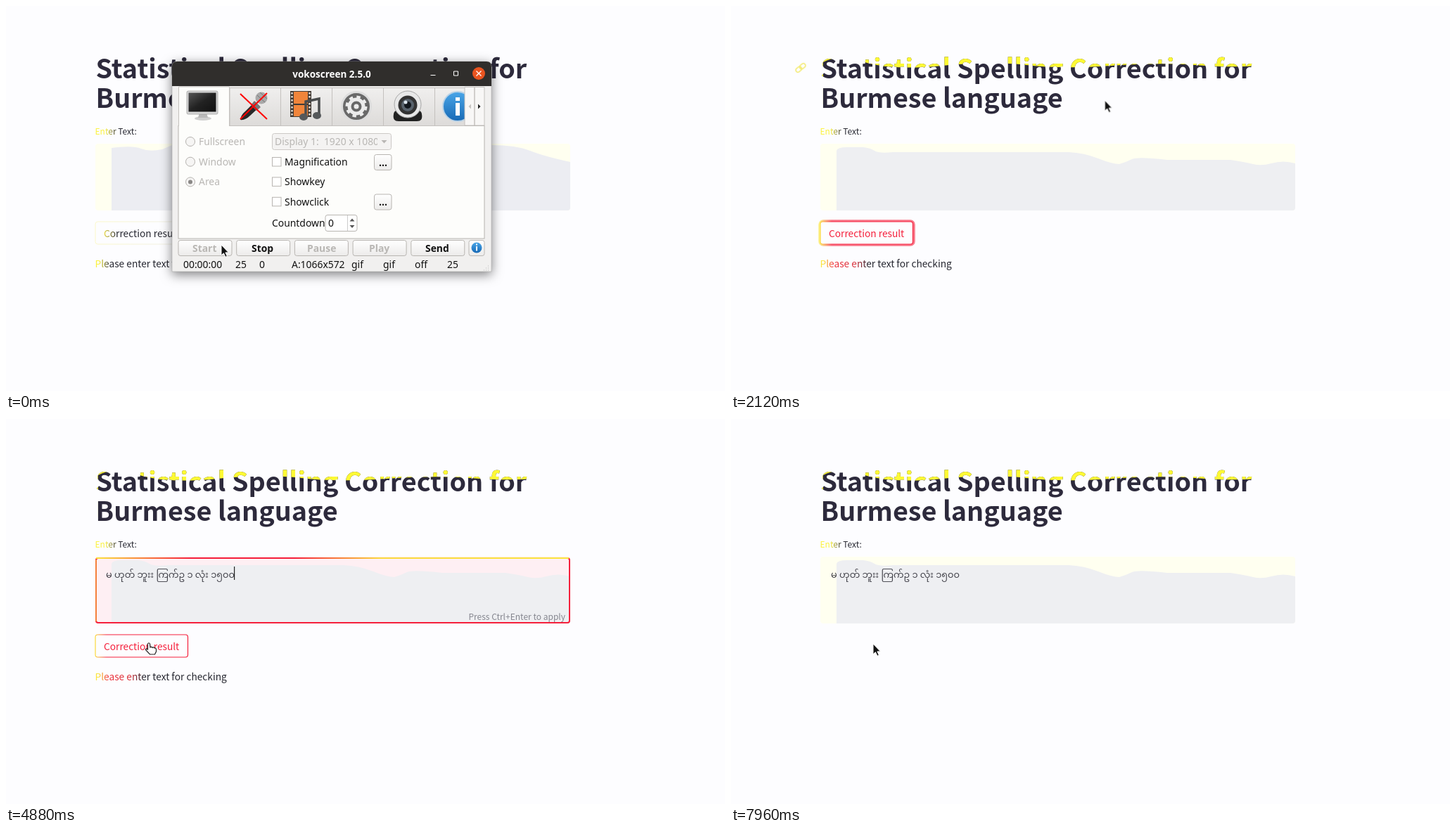
An HTML page that plays this animation: 1022x548 px, repeating every 8000 ms.

```html
<!DOCTYPE html>
<html lang="en">
<head>
<meta charset="utf-8">
<title>Spelling correction demo</title>
<style>
  html, body { margin: 0; width: 100%; height: 100%; overflow: hidden; background: #fdfdff; }
  svg { display: block; width: 1022px; height: 548px; }
  .page { font: 13.73px "Noto Sans CJK JP", "Noto Sans CJK SC", sans-serif; fill: #262730; }
  .page .title { font-size: 37.7px; font-weight: 700; fill: #2d2a3c; }
  .page .burmese { font: 300 12.95px "Noto Sans Myanmar", "Noto Sans", sans-serif; fill: #44444c; }
  .page .small { font-size: 12px; }
  .page .title.yellow { fill: #fdf935; }
  .ui { font: 13.9px "Noto Sans", "Open Sans", sans-serif; fill: #111; }
  .bold { font-weight: 700; }
  .off { fill: #b9b7b4; }
  .box { fill: #fff; stroke: #b8b5b1; }
  #window, #pointer { transform-origin: 0 0; }
  #shadow { filter: drop-shadow(0 4px 8px rgba(0, 0, 0, .5)); }
</style>
</head>
<body>
<svg viewBox="0 0 1022 548">
  <defs>
    <linearGradient id="labelInk" gradientUnits="userSpaceOnUse" x1="127" x2="186" y1="0" y2="0">
      <stop offset=".25" stop-color="#fbf23c"/><stop offset=".52" stop-color="#262730"/>
    </linearGradient>
    <linearGradient id="noteInk" gradientUnits="userSpaceOnUse" x1="127" x2="227" y1="0" y2="0">
      <stop offset=".06" stop-color="#fbf23c"/><stop offset=".2" stop-color="#262730"/>
    </linearGradient>
    <linearGradient id="noteRed" gradientUnits="userSpaceOnUse" x1="127" x2="227" y1="0" y2="0">
      <stop offset=".05" stop-color="#fbe53c"/><stop offset=".18" stop-color="#f0323c"/>
      <stop offset=".5" stop-color="#d8323c"/><stop offset=".68" stop-color="#262730"/>
    </linearGradient>
    <linearGradient id="buttonInk" gradientUnits="userSpaceOnUse" x1="139" x2="170" y1="0" y2="0">
      <stop offset="0" stop-color="#f0e040"/><stop offset=".6" stop-color="#262730"/>
    </linearGradient>
    <linearGradient id="buttonEdge" gradientUnits="userSpaceOnUse" x1="127" x2="259" y1="0" y2="0">
      <stop offset="0" stop-color="#fbf8c8"/><stop offset="1" stop-color="#eeedea"/>
    </linearGradient>
    <linearGradient id="redEdge" gradientUnits="userSpaceOnUse" x1="126" x2="160" y1="0" y2="0">
      <stop offset="0" stop-color="#fbe53c"/><stop offset=".5" stop-color="#f5203c"/>
    </linearGradient>
    <linearGradient id="topEdge">
      <stop offset="0" stop-color="#fbe53c"/><stop offset=".2" stop-color="#f5203c"/>
      <stop offset=".42" stop-color="#f5203c"/><stop offset=".6" stop-color="#fbd83c"/>
      <stop offset="1" stop-color="#fbe53c"/>
    </linearGradient>
    <linearGradient id="face" x2="0" y2="1"><stop stop-color="#fff"/><stop offset="1" stop-color="#ecebea"/></linearGradient>
    <linearGradient id="tabFace" x2="0" y2="1"><stop stop-color="#f0efee"/><stop offset="1" stop-color="#dddbd9"/></linearGradient>
    <linearGradient id="screen" x2="1" y2="1"><stop stop-color="#555"/><stop offset=".5" stop-color="#222"/><stop offset="1" stop-color="#111"/></linearGradient>
    <linearGradient id="blue" x2="0" y2="1"><stop stop-color="#4aa6e8"/><stop offset="1" stop-color="#1769b5"/></linearGradient>
    <clipPath id="titleTop"><path d="M120 60H750V85Q710 88 660 84T540 85T420 84T300 85T190 80T131 80V140H120Z"/></clipPath>
    <clipPath id="tabClip"><rect x="245" y="114" width="407" height="57"/></clipPath>
    <clipPath id="comboClip"><rect x="380" y="182" width="148" height="22"/></clipPath>
    <clipPath id="areaClip"><rect x="127" y="196" width="675" height="95" rx="4"/></clipPath>
  </defs>

  <g class="page">
    <g id="link" fill="none" stroke="#f3ea70" stroke-width="1.5" transform="rotate(-40 99 88)">
      <rect x="91" y="85" width="9" height="6" rx="3"/><rect x="98" y="85" width="9" height="6" rx="3"/>
    </g>
    <g class="title"><text x="127.500" y="103">Statistical Spelling Correction for</text><text x="127.500" y="145">Burmese language</text></g>
    <g id="tint" clip-path="url(#titleTop)">
      <g class="title yellow"><text x="127.500" y="102.500">Statistical Spelling Correction for</text><text x="127.500" y="145">Burmese language</text></g>
    </g>
    <text class="small" x="126.5" y="183" fill="url(#labelInk)">Enter Text:</text>

    <g clip-path="url(#areaClip)">
      <rect x="127" y="196" width="675" height="95" fill="#fffff0"/>
      <rect id="pink" x="127" y="196" width="675" height="95" fill="#feeff3"/>
      <path id="waveEarly" fill="#ecedf2" d="M150 291V202Q180 198 192 203T222 204L236 198H690Q725 198 745 206T802 222V291Z"/>
      <path id="waveLate" fill="#eeeff2" d="M150 291V206Q151 201 165 201H188Q198 202 204 206T230 208H480Q502 209 522 217T552 225Q562 222 570 218T620 219H710Q730 222 742 225T768 224Q785 219 802 224V291Z"/>
    </g>
    <g id="focus">
      <rect x="128" y="198" width="673" height="92" rx="3" fill="none" stroke="#f5203c" stroke-width="2"/>
      <rect x="128" y="197" width="672" height="2" fill="url(#topEdge)"/>
      <path d="M128 200V288" stroke="#f5a03c" stroke-width="1.5"/>
    </g>
    <text id="typed" class="burmese" x="142" y="225.5">မ ဟုတ် ဘူးး ကြက်ဥ ၁ လုံး ၁၅၀၀</text>
    <text id="hint" class="small" x="795" y="285.5" text-anchor="end" fill="#85868f">Press Ctrl+Enter to apply</text>
    <rect id="caret" y="210" width="1.2" height="19" fill="#222"/>

    <g id="stale">
      <g id="plain">
        <rect x="127" y="307" width="131.5" height="32" rx="3.5" fill="#fdfdff" stroke="url(#buttonEdge)"/>
        <text x="139" y="328.5" fill="url(#buttonInk)">Correction result</text>
        <text x="126.5" y="371.5" fill="url(#noteInk)">Please enter text for checking</text>
      </g>
      <g id="hot">
        <rect id="ring" x="126" y="306" width="134" height="34" rx="5" fill="none" stroke="url(#redEdge)" stroke-opacity=".6" stroke-width="3.5"/>
        <rect x="127" y="307" width="131.5" height="32" rx="3.5" fill="#fdfdff" stroke="url(#redEdge)" stroke-width="1.2"/>
        <text x="139" y="328.5" fill="#f5203c">Correction result</text>
        <text x="126.5" y="371.5" fill="url(#noteRed)">Please enter text for checking</text>
      </g>
    </g>
  </g>

  <g id="window" class="ui">
    <path id="shadow" fill="#f1f0ef" stroke="#aaa" stroke-width=".6" d="M236 378V86Q236 79 243 79H683Q690 79 690 86V378Z"/>
    <path fill="#302e2c" d="M236 114V86Q236 79 243 79H683Q690 79 690 86V114Z"/>
    <path id="glow" stroke="#fbf23c" stroke-width="2" fill="none" d="M237 83Q238 79.500 244 79.500H683Q688 80 689 83"/>
    <text class="bold" x="463" y="101.500" text-anchor="middle" style="font-size:13.5px;fill:#fff">vokoscreen 2.5.0</text>
    <circle id="hover" cx="607" cy="96" r="9.500" fill="#5c5a57"/>
    <path d="M603.500 98.500H610.500M636.500 93H642.500V99H636.500Z" fill="none" stroke="#fff"/>
    <circle cx="672" cy="96" r="9" fill="#e95420"/>
    <path d="M668.500 92.500L675.500 99.500M675.500 92.500L668.500 99.500" stroke="#fff" stroke-width="1.3"/>

    <rect x="245" y="170.500" width="435" height="160.500" fill="#fdfdfb" stroke="#b5b2ae"/>
    <g clip-path="url(#tabClip)">
      <g id="tabs"></g>
      <path d="M245.500 171.500V115H317.500V171.500" fill="#fdfdfb" stroke="#c4c1be"/>
      <rect x="246" y="168" width="71" height="4" fill="#fdfdfb"/>
      <ellipse cx="280" cy="160" rx="12" ry="3" fill="#cfcfcf"/><path d="M275 152H285L287 159H273Z" fill="#b9b9b9"/>
      <rect x="257" y="121" width="44" height="33" rx="2" fill="#d6d6d6" stroke="#999" stroke-width=".7"/>
      <rect x="259.500" y="123.500" width="39" height="27" fill="url(#screen)"/>
      <path d="M333 162Q334 155 340 150L354 136L361 143L347 156Q340 163 333 162Z" fill="#282828"/>
      <path d="M353 135L362 144L356 149L348 141Z" fill="#777"/>
      <circle cx="363" cy="131" r="8.500" fill="#a9a9a9"/><path d="M357 127L368 137M361 123L371 132" stroke="#777"/>
      <path d="M333 125L371 161M371 124L333 161" stroke="#f00" stroke-width="2"/>
      <rect x="404" y="121" width="30" height="37" fill="#413a34"/>
      <path d="M409 122V139H429V122ZM409 141V157H429V141Z" fill="#f0853b"/>
      <path d="M406.500 123V158M431.500 123V158" stroke="#e6dfd6" stroke-width="2.500" stroke-dasharray="2.500 2.500"/>
      <path d="M426 157V136L445 132V155" fill="none" stroke="#4a4c4d" stroke-width="3.500"/>
      <ellipse cx="423" cy="158" rx="6" ry="5" fill="#55585a"/><ellipse cx="442" cy="156" rx="6" ry="5" fill="#55585a"/>
      <circle cx="498" cy="143" r="20.500" fill="#696969" stroke="#ddd" stroke-width="3"/>
      <circle cx="498" cy="143" r="10" fill="none" stroke="#ececec" stroke-width="5"/>
      <circle cx="498" cy="143" r="13.500" fill="none" stroke="#ececec" stroke-width="4" stroke-dasharray="5.300"/>
      <circle cx="498" cy="143" r="3.500" fill="#eee"/>
      <path d="M551 154Q551 146 571 146T591 154Q593 164 584 164H558Q549 164 551 154Z" fill="#222"/>
      <circle cx="571" cy="140" r="19" fill="#e8e8e8" stroke="#a5a5a5"/>
      <circle cx="571" cy="141" r="13.500" fill="#333"/><circle cx="571" cy="141" r="9" fill="#58626c"/>
      <circle cx="571" cy="141" r="5" fill="#12171d"/><circle cx="568" cy="137" r="2.500" fill="#dde6ee"/>
      <circle cx="642" cy="143" r="21" fill="url(#blue)" stroke="#b9d2e6" stroke-width="2"/>
      <path d="M639 138H645V156H639ZM639 130H645V135H639Z" fill="#fff"/>
    </g>
    <path d="M652 115.500H666V170H652ZM666 115.500H680V170H666Z" fill="#f8f7f6" stroke="#c4c1be"/>
    <path d="M661 139.500V146.500L657.500 143Z" fill="#c5c3c0"/><path d="M671 139.500V146.500L674.500 143Z" fill="#222"/>

    <g id="controls"></g>
    <rect x="378.500" y="181.500" width="169" height="23" rx="3" fill="#f4f3f2" stroke="#ccc9c6"/>
    <text class="off" x="382" y="198" clip-path="url(#comboClip)" xml:space="preserve">Display 1:  1920 x 1080</text>
    <path d="M533.500 191H541.500L537.500 195.500Z" fill="#b9b7b4"/>
    <text x="378" y="314">Countdown</text>
    <rect class="box" x="454" y="297.500" width="45" height="23" rx="3"/><path d="M485.500 298V320" stroke="#ccc"/>
    <text x="458" y="314">0</text>
    <path d="M488.500 306.500H495.500L492 302.500ZM488.500 312H495.500L492 316Z" fill="#555"/>
    <rect x="658" y="333.500" width="22" height="22" rx="3" fill="url(#face)" stroke="#bbb8b4"/>
    <circle cx="669" cy="344" r="7.500" fill="url(#blue)"/><path d="M669 342V348.500M669 338.500V340.500" stroke="#fff" stroke-width="2"/>
    <g id="status"></g>
    <g id="before"></g>
    <g id="after"></g>
    <path d="M679 376H688M682 373H688M685 370H688" stroke="#bbb" stroke-dasharray="1 2"/>
  </g>

  <g id="pointer">
    <path id="arrow" d="M0 0V15L3.400 11.800L6 17.300L8.400 16.200L5.900 10.900H10.400Z" fill="#111" stroke="#fff" stroke-width="1"/>
    <path id="beam" d="M-3 -6.500H-1L0 -5.500L1 -6.500H3M0 -5.500V6.500M-3 7.500H-1L0 6.500L1 7.500H3" fill="none" stroke="#222" stroke-width="1.200"/>
    <path id="hand" d="M-.500 0Q1 -2.500 2.500 0L3 5Q5 3.500 6 5.500Q8 4 9 6Q11.500 5.500 11.500 8.500V11L9.500 15H2.500L-3.500 8.500Q-3.500 6 -.500 8Z" fill="#fff" stroke="#222" stroke-width="1.200"/>
  </g>
</svg>
<script>
const LOOP = 8000;
const $ = id => document.getElementById(id);
const label = (x, y, text, cls = '') => `<text x="${x}" y="${y}" class="${cls}">${text}</text>`;

$('tabs').innerHTML = [318, 390.5, 463.5, 536.5, 609.5].map(x =>
  `<rect x="${x}" y="116.500" width="73" height="54" fill="url(#tabFace)" stroke="#c4c1be"/>`).join('');

const button = (x, y, w, h) =>
  `<rect x="${x}" y="${y}" width="${w}" height="${h}" rx="3" fill="url(#face)" stroke="#b8b5b1"/>`;
const radios = ['Fullscreen', 'Window', 'Area'].map((name, i) => {
  const y = 193 + i * 28.7;
  const dot = i === 2 ? `<circle cx="262" cy="${y}" r="3" fill="#8a8886"/>` : '';
  return `<circle cx="262" cy="${y}" r="6.500" fill="#f6f5f4" stroke="#b5b2ae"/>${dot}${label(274, y + 5, name, 'off')}`;
});
const checks = ['Magnification', 'Showkey', 'Showclick'].map((name, i) => {
  const y = 215.5 + i * 28.4;
  return `<rect class="box" x="378.500" y="${y}" width="12.500" height="12.500"/>${label(396, y + 11.5, name)}`;
});
const dots = [211.5, 268].map(y => button(523.5, y, 24.5, 22) + label(530, y + 16, '...', 'bold'));
const actions = [['Start', 265, 1], ['Stop', 349], ['Pause', 428, 1], ['Play', 516, 1], ['Send', 596]]
  .map(([name, x, off], i) => button(245 + i * 82.7, 333.5, 76, 22) + label(x, 349.5, name, off ? 'bold off' : 'bold'));
$('controls').innerHTML = [...radios, ...checks, ...dots, ...actions].join('');

const row = cells => cells.map(([x, text]) => label(x, 372.5, text)).join('');
$('status').innerHTML = row([[406, 'A:1066x572'], [491, 'gif'], [536, 'gif'], [581, 'off'], [627, '25']]);
$('before').innerHTML = row([[252, '00:00:00'], [326, '25'], [360, '0']]);
$('after').innerHTML = row([[252, '00:00:01'], [326, '28'], [360, '512']]);

// Steps are [ms, value, easing to the next step]; without easing the value holds.
function track(id, prop, steps) {
  const frames = [...steps, [LOOP, steps[steps.length - 1][1]]].map(([ms, value, easing = 'step-end']) =>
    ({ offset: ms / LOOP, [prop]: value, easing }));
  $(id).animate(frames, { duration: LOOP, iterations: Infinity });
}
const fade = (id, ...steps) => track(id, 'opacity', steps);
const move = (x, y, s = 1) => `translate(${x}px, ${y}px) scale(${s})`;

track('pointer', 'transform', [
  [0, move(306, 340)], [40, move(306, 340), 'ease-in-out'], [760, move(545, 146)],
  [960, move(545, 146), 'ease-out'], [1360, move(597, 93)],
  [1840, move(597, 93), 'ease-in'], [2120, move(532, 134), 'ease-out'], [2560, move(359, 228)],
  [4240, move(359, 228), 'ease-in-out'], [4600, move(202, 320)]
]);
fade('arrow', [0, 1], [2320, 0], [7960, 1]);
fade('beam', [0, 0], [2320, 1], [4440, 0]);
fade('hand', [0, 0], [4440, 1], [7960, 0]);

track('window', 'transform', [
  [0, move(0, 0)], [1760, move(0, 0), 'cubic-bezier(.5,0,.9,.6)'], [2000, move(-59, 494, .08)]
]);
fade('window', [0, 1], [1760, 1, 'ease-in'], [2000, 0]);
fade('hover', [0, 0], [1240, 1]);
fade('glow', [0, 0], [760, 1]);
fade('before', [0, 1], [960, 0]);
fade('after', [0, 0], [960, 1]);

fade('tint', [0, 0], [80, 1]);
fade('link', [0, 0], [1800, 1], [2240, 0]);
fade('waveEarly', [0, 1], [1800, 0]);
fade('waveLate', [0, 0], [1800, 1]);

for (const id of ['focus', 'pink'])
  fade(id, [0, 0], [2680, 0, 'ease'], [2880, 1], [5320, 1, 'ease'], [5520, 0]);
fade('typed', [0, 0], [3680, 1]);
fade('hint', [0, 0], [3680, 1], [5360, 0]);
fade('caret', [0, 0], [2720, 1], [3280, 0], [3680, 1], [4240, 0], [4880, 1], [5320, 0]);
track('caret', 'transform', [[0, move(142, 0)], [3680, move(324, 0)]]);

fade('hot', [0, 0], [1760, 1], [2680, 1, 'ease'], [2880, 0], [4440, 0, 'ease'], [4600, 1]);
fade('ring', [0, 1], [2880, 0], [5320, 0, 'ease'], [5560, 1]);
fade('plain', [0, 1], [1760, 0], [2680, 0, 'ease'], [2880, 1], [4440, 1, 'ease'], [4600, 0]);
fade('stale', [0, 1], [5960, 1, 'ease-in'], [6960, .33], [7920, 0]);
</script>
</body>
</html>
```
